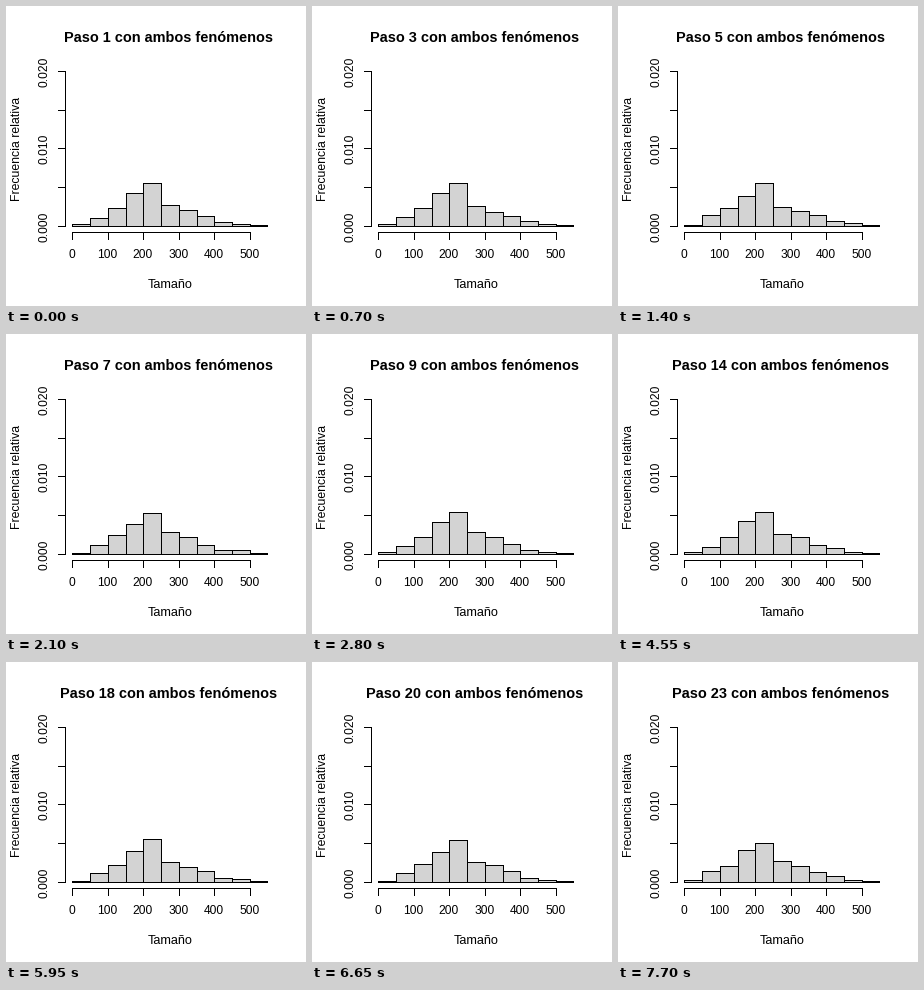
A matplotlib script for the animation above (8000 ms loop, 300 px wide and 300 px high).

```python
import numpy as np
import matplotlib.pyplot as plt
from matplotlib.animation import FuncAnimation
from matplotlib.patches import Rectangle

SIZE, DPI = 300, 100
PX = 72 / DPI
TICK_MS, STEP_MS, LOOP_MS = 50, 350, 8000
STEPS = 23
BIN, SAMPLES = 50, 2000

# Mean share of each size class; every step is a fresh random sample of it.
SHARES = np.array([1.4, 9.2, 17.5, 32, 42.4, 21, 16, 10, 4.9, 2.4, 0.8])


def sample_densities():
    rng = np.random.default_rng(7)
    counts = rng.multinomial(SAMPLES, SHARES / SHARES.sum(), size=STEPS)
    return counts / (SAMPLES * BIN)


def x_pos(value):
    return int(66.84 + value * 0.35475)


def y_pos(value):
    return int(220.36 - value * 7755.6)


fig = plt.figure(figsize=(SIZE / DPI, SIZE / DPI), dpi=DPI, facecolor="white")
ax = fig.add_axes([0, 0, 1, 1])
ax.set(xlim=(0, SIZE), ylim=(SIZE, 0))
ax.axis("off")


def line(x0, y0, x1, y1):
    ax.plot([x0, x1], [y0, y1], color="black", lw=PX, antialiased=False)


def label(x, y, text, size=12, **kw):
    return ax.text(x, y, text, fontsize=size * PX, family="Liberation Sans",
                   ha="center", va="baseline", rotation_mode="anchor", **kw)


# Axes
line(x_pos(0), 226, x_pos(500), 226)
for v in range(0, 501, 100):
    x = x_pos(v)
    line(x, 226, x, 233)
    label(x - 0.5, 252, str(v))

line(59, y_pos(0), 59, y_pos(0.02))
for i in range(5):
    y = y_pos(i * 0.005)
    line(52, y, 59, y)
    if i % 2 == 0:
        label(42, y + 0.5, f"{i * 0.005:.3f}", rotation=90)

label(164, 282, "Tamaño", size=12.6)
label(14, 142.8, "Frecuencia relativa", size=12.2, rotation=90)
title = label(163, 36, "", size=14.5, weight="bold")

# Bars
densities = sample_densities()
base = y_pos(0)
edges = [x_pos(BIN * k) for k in range(len(SHARES) + 1)]
bars = [
    ax.add_patch(Rectangle((left, base), right - left, 0, lw=PX,
                           facecolor="#d3d3d3", edgecolor="black",
                           antialiased=False))
    for left, right in zip(edges, edges[1:])
]


def update(frame):
    step = min(frame * TICK_MS // STEP_MS, STEPS - 1)
    title.set_text(f"Paso {step + 1} con ambos fenómenos")
    for bar, density in zip(bars, densities[step]):
        bar.set_height(y_pos(density) - base)
    return [title, *bars]


anim = FuncAnimation(fig, update, frames=LOOP_MS // TICK_MS, interval=TICK_MS,
                     repeat=True, repeat_delay=0, blit=False)
plt.show()
```
